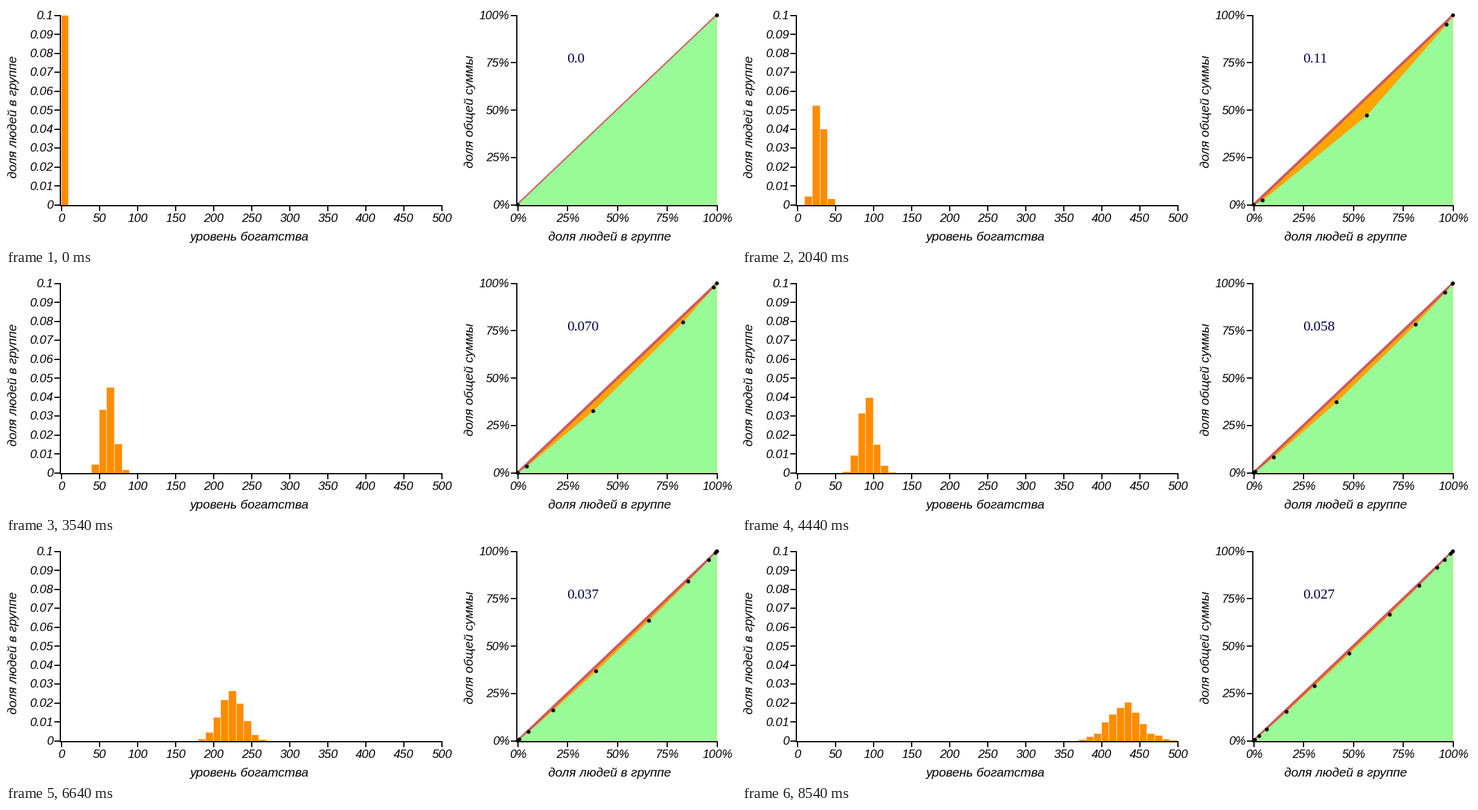
Recreate the animation shown at these times as a matplotlib script. Size 1209 by 399 pixels, loop 8640 ms.

```python
import math
import numpy as np
import matplotlib.pyplot as plt
from matplotlib.animation import FuncAnimation
from matplotlib.collections import PolyCollection

W, H, DPI = 1209, 399, 64
PT = 72 / DPI                      # points per pixel
INTERVAL, FRAMES = 40, 216
BIN = 10
EDGES = np.arange(0, 601, BIN)
CENTRES = EDGES[:-1] + BIN / 2

BASE_Y, TOP_Y = 330.5, 15.5
LEFT_X, LEFT_W = 91.5, 630
RIGHT_X, RIGHT_W = 847.5, 330

# step: (mean wealth, first bin start, people per thousand in each bin)
KEYS = {
    0: (0, 0, [1000]),
    21: (28.6, 10, [45, 523, 400, 32]),
    36: (62.0, 40, [46, 333, 451, 154, 16]),
    45: (91.4, 60, [8, 93, 315, 397, 148, 37, 2]),
    59: (164.1, 120, [1, 28, 103, 226, 311, 215, 90, 22, 4]),
    74: (288.2, 240, [6, 37, 100, 160, 227, 220, 141, 82, 22, 5]),
    86: (430.3, 370, [6, 22, 38, 99, 141, 174, 203, 148, 90, 38, 29, 10, 2]),
}
KEY_STEPS = list(KEYS)
LOG_FACT = np.array([math.lgamma(n + 1) for n in range(601)])


def trend(step):
    return 1.473 * step - 0.0191 * step**2 + 0.0007 * step**3


MEAN_OFFSETS = [KEYS[s][0] - trend(s) for s in KEY_STEPS]


def poisson_cdf(mean):
    """P(X < edge) for every bin edge."""
    n = np.arange(601)
    pmf = np.exp(n * math.log(mean) - mean - LOG_FACT)
    return np.concatenate([[0], np.cumsum(pmf)])[EDGES]


def z_score(mean):
    return (EDGES - mean) / math.sqrt(mean)


def sample_deviation(step):
    """Difference of the drawn sample from the Poisson law, over z-scores."""
    mean, start, counts = KEYS[step]
    mean = max(mean, 1e-6)
    shares = np.zeros(len(CENTRES))
    first = start // BIN
    shares[first:first + len(counts)] = np.array(counts) / 1000
    seen = np.concatenate([[0], np.cumsum(shares)])
    return z_score(mean), seen - poisson_cdf(mean)


DEVIATIONS = [sample_deviation(s) for s in KEY_STEPS]


def bin_shares(step):
    mean = max(trend(step) + np.interp(step, KEY_STEPS, MEAN_OFFSETS), 1e-6)
    z = z_score(mean)
    at_keys = [np.interp(z, *dev) for dev in DEVIATIONS]
    i = min(np.searchsorted(KEY_STEPS, step, side="right") - 1, len(KEY_STEPS) - 2)
    mix = (step - KEY_STEPS[i]) / (KEY_STEPS[i + 1] - KEY_STEPS[i])
    cdf = poisson_cdf(mean) + (1 - mix) * at_keys[i] + mix * at_keys[i + 1]
    shares = np.diff(np.maximum.accumulate(np.clip(cdf, 0, 1)))
    shares[shares < 5e-4] = 0
    return shares / shares.sum()


def lorenz(shares):
    people = np.concatenate([[0], np.cumsum(shares)])
    wealth = np.concatenate([[0], np.cumsum(shares * CENTRES)])
    return people, wealth / wealth[-1]


def gini_label(people, wealth):
    gini = 1 - np.sum(np.diff(people) * (wealth[1:] + wealth[:-1]))
    if gini < 1e-4:
        return "0.0"
    return f"{gini:.{1 - math.floor(math.log10(gini))}f}"


fig = plt.figure(figsize=(W / DPI, H / DPI), dpi=DPI, facecolor="white")
ax = fig.add_axes([0, 0, 1, 1])
ax.set_xlim(0, W)
ax.set_ylim(H, 0)
ax.axis("off")


def text(x, y, s, size=20, ha="center", **kw):
    style = dict(family="Liberation Sans", style="italic", color="black")
    style.update(kw)
    return ax.text(x, y, s, fontsize=size * PT, ha=ha, va="baseline",
                   rotation_mode="anchor", zorder=6, **style)


def line(xs, ys, color="black", width=2, zorder=5):
    ax.plot(xs, ys, color=color, lw=width * PT, zorder=zorder,
            solid_capstyle="butt")


def chart_axes(x0, width, x_labels, y_labels, size=20):
    axis_x, axis_y = x0 - 1.4, BASE_Y + 1.4
    line([axis_x, axis_x], [TOP_Y - 1, axis_y + 1])
    line([axis_x - 1, x0 + width + 1], [axis_y, axis_y])
    for x, label in zip(np.linspace(x0, x0 + width, len(x_labels)), x_labels):
        line([x + 0.1, x + 0.1], [axis_y, axis_y + 9])
        text(x + 0.5, 359, label, size)
    for y, label in zip(np.linspace(BASE_Y, TOP_Y, len(y_labels)), y_labels):
        line([axis_x - 10, axis_x], [y + 0.1, y + 0.1])
        text(x0 - 13.5, y + 6.5, label, size, ha="right")


percents = [f"{p}%" for p in range(0, 101, 25)]
chart_axes(LEFT_X, LEFT_W, range(0, 501, 50),
           [f"{v / 100:g}" for v in range(11)])
chart_axes(RIGHT_X, RIGHT_W, percents, percents, 19.5)
text(403, 390, "уровень богатства", 21)
text(1000, 390, "доля людей в группе", 21)
text(18, 184, "доля людей в группе", 21, rotation=90)
text(774, 175.5, "доля общей суммы", 21, rotation=90)

# Inequality gap, line of equality, then the area under the Lorenz curve
CORNER = (RIGHT_X + RIGHT_W, BASE_Y)
ax.fill([RIGHT_X, CORNER[0], CORNER[0]], [BASE_Y, TOP_Y, BASE_Y],
        color="#FFA500", lw=0, zorder=1)
line([RIGHT_X, CORNER[0]], [BASE_Y, TOP_Y], "#CD5C5C", 4.4, 2)
area, = ax.fill([0, 0, 0], [0, 0, 0], color="#98FB98", lw=0, zorder=3)
dots = PolyCollection([], facecolors="black", linewidths=0, zorder=7)
bars = PolyCollection([], facecolors="#FF8C00", edgecolors="#FFE9CC",
                      linewidths=1 * PT, zorder=2)
ax.add_collection(dots, autolim=False)
ax.add_collection(bars, autolim=False)
value = text(929, 94, "0.0", 23.5, ha="left", family="Liberation Serif",
             style="normal", color="#00004D")

angles = np.linspace(0, 2 * math.pi, 24, endpoint=False)
DOT = 3.2 * np.column_stack([np.cos(angles), np.sin(angles)])


def bar_corners(start, share):
    x0 = LEFT_X - 0.7 + start * LEFT_W / 500
    x1 = x0 + BIN * LEFT_W / 500
    base = BASE_Y + 0.4
    top = BASE_Y - 0.4 - share * (BASE_Y - TOP_Y)
    return [(x0, base), (x0, top), (x1, top), (x1, base)]


def update(i):
    # The first step is shown for 40 ms, each later one for 100 ms
    step = (INTERVAL * i + 80) // 100
    shares = bin_shares(step)
    people, wealth = lorenz(shares)
    points = np.column_stack([RIGHT_X + RIGHT_W * people,
                              BASE_Y - (BASE_Y - TOP_Y) * wealth])
    bars.set_verts([bar_corners(e, s) for e, s in zip(EDGES, shares) if s > 0])
    area.set_xy(np.vstack([points, CORNER]))
    dots.set_verts([p + DOT for p in np.unique(points.round(2), axis=0)])
    value.set_text(gini_label(people, wealth))
    return bars, area, dots, value


anim = FuncAnimation(fig, update, frames=FRAMES, interval=INTERVAL,
                     repeat=True, repeat_delay=0)
plt.show()
```
